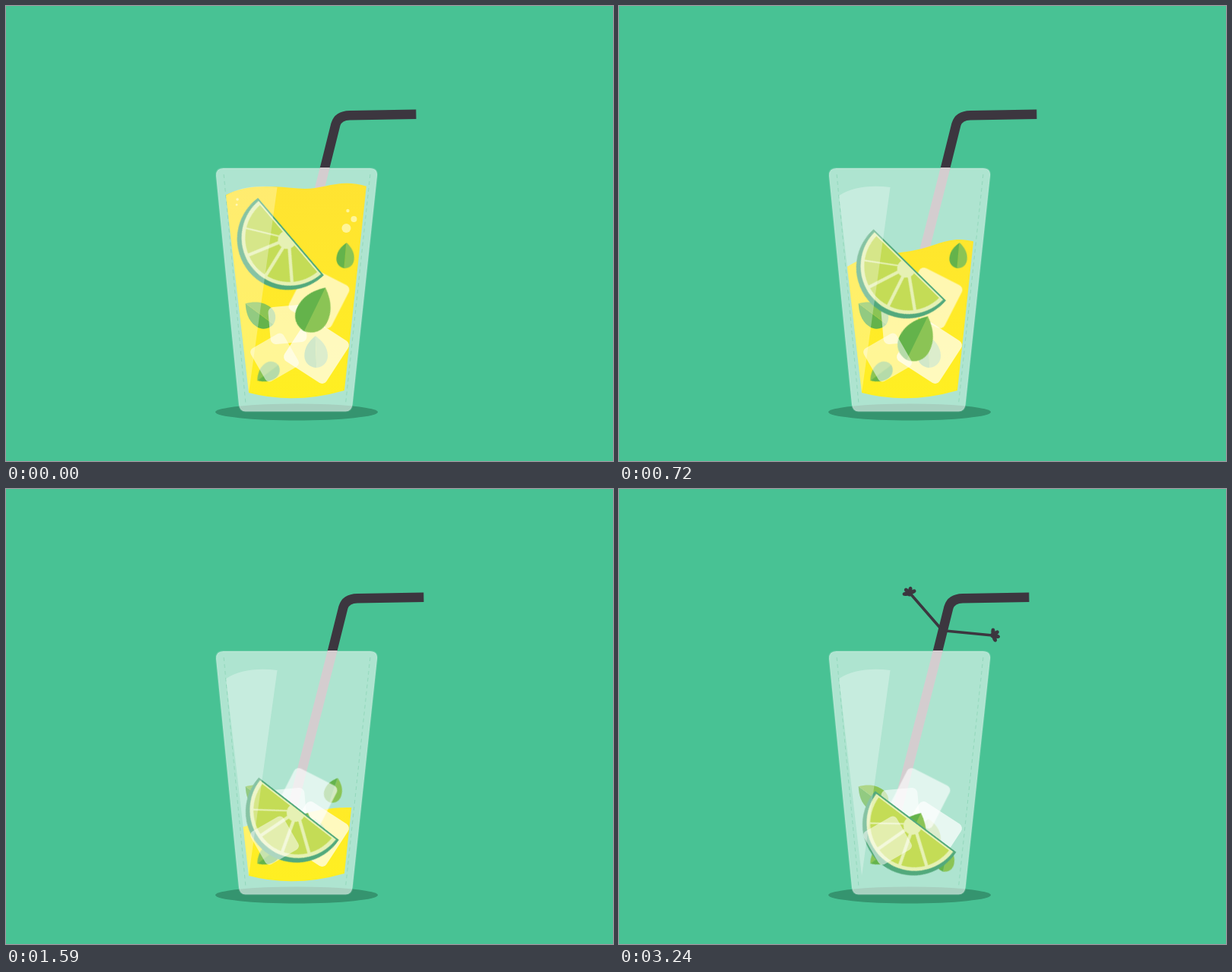
These frames come from a looping animation (800x600 px, 3.27 s). An HTML page:

```html
<!DOCTYPE html>
<html lang="en">
<head>
<meta charset="utf-8">
<title>Lemonade</title>
<style>
  html, body { margin: 0; width: 100%; height: 100%; overflow: hidden; background: #48c294; }
  svg { display: block; width: 800px; height: 600px; }

  .move { animation: 3270ms linear infinite; }
  #straw, #strawInGlass { animation-name: slide; }
  #liquid { animation-name: drain; }
  #lime { animation-name: lime; }
  #bigLeaf { animation-name: bigLeaf; }
  #smallLeaf { animation-name: smallLeaf; }
  #looseIce { animation-name: looseIce; }
  #arms { animation-name: pop; transform-origin: 427px 186px; }

  @keyframes slide {
    0% { transform: translateX(0); animation-timing-function: ease-in-out; }
    9.2%, 59.6% { transform: translateX(10px); animation-timing-function: ease-in-out; }
    67.9%, 100% { transform: translateX(0); }
  }
  @keyframes drain {
    0% { d: path("M280 255C310 233 350 237 385 240.5S440 223 485 241V530H280Z"); }
    15.6% { d: path("M280 350C305 300 345 306 385 300S440 262 485 284V530H280Z"); }
    29.36% { d: path("M280 378C315 356 345 357 385 349S440 336 485 354V530H280Z"); }
    36.7% { d: path("M280 412C315 390 345 392 385 382S440 368 485 400V530H280Z"); }
    48.62% { d: path("M280 460C315 440 345 438 385 429S440 418 485 421V530H280Z"); }
    64.22% { d: path("M280 490C315 512 345 514 385 515S440 508 485 492V530H280Z"); }
    67.5%, 100% { d: path("M280 502C315 524 345 526 385 527S440 520 485 504V530H280Z"); }
  }
  @keyframes lime {
    0% { transform: translate(375.5px, 304px) rotate(49.6deg); }
    15.6% { transform: translate(380.5px, 324.5px) rotate(47.5deg); }
    29.36% { transform: translate(386.5px, 360.5px) rotate(41.3deg); }
    36.7% { transform: translate(381.5px, 397.5px) rotate(38.2deg); }
    48.62% { transform: translate(386px, 421.5px) rotate(37.9deg); }
    62%, 100% { transform: translate(391px, 438.5px) rotate(37deg); }
  }
  @keyframes bigLeaf {
    0% { transform: translate(0, 0); }
    15.6% { transform: translate(-6px, 22px); }
    29.36%, 100% { transform: translate(-23px, 56px); }
  }
  @keyframes smallLeaf {
    0%, 23% { transform: translate(447.5px, 329px) rotate(5deg); }
    29.36% { transform: translate(443px, 346px) rotate(8deg); }
    36.7% { transform: translate(438.5px, 365px) rotate(15deg); }
    48.62% { transform: translate(432px, 397px) rotate(18deg); }
    63%, 100% { transform: translate(431px, 488px) rotate(12deg); }
  }
  @keyframes looseIce {
    0%, 27.5% { transform: translate(412.5px, 385px) rotate(27deg); }
    29.36% { transform: translate(411.5px, 386px) rotate(28.5deg); }
    36.7% { transform: translate(397px, 406px) rotate(31deg); }
    44%, 100% { transform: translate(396.5px, 408px) rotate(27deg); }
  }
  @keyframes pop {
    0%, 69% { transform: scale(0); animation-timing-function: ease-out; }
    79%, 100% { transform: scale(1); }
  }
</style>
</head>
<body>
<svg viewBox="0 0 800 600">
  <defs>
    <clipPath id="inner"><path d="M284.2 200L320 510Q380 526 446 507L479 200Z"/></clipPath>
    <linearGradient id="juice" gradientUnits="userSpaceOnUse" x1="0" y1="235" x2="0" y2="515">
      <stop offset="0" stop-color="#ffe332"/>
      <stop offset="1" stop-color="#ffef22"/>
    </linearGradient>
    <g id="leaf">
      <path fill="#64b34b" d="M0-32C-12-22-22-10-22 8C-22 22-12 31 0 32Z"/>
      <path fill="#8bc455" d="M0-32C12-22 22-10 22 8C22 22 12 31 0 32Z"/>
    </g>
    <g id="hand" fill="#3c363f">
      <circle r="3.5"/>
      <ellipse cy="-5" rx="2.6" ry="4.4" transform="rotate(-80)"/>
      <ellipse cy="-5" rx="2.6" ry="4.4" transform="rotate(-28)"/>
      <ellipse cy="-5" rx="2.6" ry="4.4" transform="rotate(24)"/>
      <ellipse cy="-5" rx="2.6" ry="4.4" transform="rotate(76)"/>
    </g>
  </defs>

  <rect width="800" height="600" fill="#48c294"/>
  <ellipse cx="383" cy="535.5" rx="107" ry="11" fill="#35946f"/>

  <g id="straw" class="move">
    <path d="M540.5 142.8L453 144.2Q438 144.5 434.5 156L419.5 216" fill="none" stroke="#3c363f" stroke-width="12.4"/>
  </g>

  <!-- glass -->
  <path d="M286.5 214H479.5Q490 214 489 224L456.500 525.500Q455.500 534.500 447.500 534.500H315.500Q308 534.500 307 525.500L277 224Q276.500 214 286.500 214Z" fill="#fff" fill-opacity=".56" stroke="#fff" stroke-opacity=".16" stroke-width="2"/>
  <path d="M287 222L316 525M480 222L447.500 525" fill="none" stroke="#86d2b3" stroke-opacity=".7" stroke-dasharray="5 4"/>

  <g id="strawInGlass" class="move">
    <path d="M413.800 213H426.800L371.500 430H358.500Z" fill="#d4cdcf"/>
  </g>

  <g clip-path="url(#inner)">
    <path id="liquid" class="move" fill="url(#juice)" d="M280 255C310 233 350 237 385 240.5S440 223 485 241V530H280Z"/>
  </g>
  <g id="bubbles" fill="#fff59a"></g>

  <use href="#leaf" transform="translate(408.5 456) rotate(-2) scale(.7 .66)"/>
  <g id="smallLeaf" class="move"><use href="#leaf" transform="scale(.53)"/></g>
  <g id="looseIce" class="move"><rect x="-31.500" y="-31.500" width="63" height="63" rx="7" fill="#fff" fill-opacity=".63"/></g>
  <rect x="-33" y="-33" width="66" height="66" rx="7" transform="translate(409 455) rotate(33)" fill="#fff" fill-opacity=".7"/>
  <use href="#leaf" transform="translate(334 406) rotate(-53) scale(.72)"/>
  <rect x="-24" y="-24.500" width="48" height="49" rx="7" transform="translate(371 420) rotate(-5)" fill="#fff" fill-opacity=".58"/>
  <g id="bigLeaf" class="move"><use href="#leaf" transform="translate(407 400) rotate(26)"/></g>
  <use href="#leaf" transform="translate(345 483.5) rotate(-127) scale(.54)"/>

  <g id="lime" class="move">
    <path d="M-66.800 0A67 67 0 1 0 66.800 0Z" fill="#52a97c"/>
    <path d="M-63.500 2A63.500 63.500 0 1 0 63.500 2Z" fill="#e6f1b4"/>
    <path d="M-58 3A58 58 0 1 0 58 3Z" fill="#c4dc56"/>
    <g id="ribs" stroke="#e6f1b4"></g>
    <path d="M-11 2A12 12 0 1 0 11 2Z" fill="#e6f1b4"/>
    <path d="M-62 3H62" stroke="#e6f1b4" stroke-width="2"/>
  </g>

  <rect x="-25" y="-25" width="50" height="50" rx="6" transform="translate(354 463.500) rotate(-30)" fill="#fff" fill-opacity=".52"/>
  <path d="M290 250Q315 234 357.500 239L320 510Z" fill="#fff" fill-opacity=".3"/>

  <g id="arms" class="move">
    <path d="M424 184L384 138M430 187L492 193" stroke="#3c363f" stroke-width="3.600"/>
    <use href="#hand" transform="translate(383 138) rotate(-15)"/>
    <use href="#hand" transform="translate(493 193) rotate(80)"/>
  </g>
</svg>
<script>
  const NS = "http://www.w3.org/2000/svg";
  const add = (parent, tag, attrs) => {
    const el = document.createElementNS(NS, tag);
    for (const key in attrs) el.setAttribute(key, attrs[key]);
    return document.getElementById(parent).appendChild(el);
  };

  // four ribs split the half slice into five equal segments
  for (let i = 1; i < 5; i++) {
    add("ribs", "line", {
      x1: 0, y1: 4, x2: 59, y2: 4, "stroke-width": i === 4 ? 2 : 4.2,
      transform: `rotate(${i * 36} 0 4)`
    });
  }

  // each bubble vanishes when the surface reaches it
  const bubbles = [[448.5, 293, 6, 480], [458.5, 281, 4, 390], [450.5, 270, 2.2, 290], [305, 255, 1.8, 60], [304, 262, 1.5, 90]];
  for (const [cx, cy, r, end] of bubbles) {
    const at = end / 3270;
    add("bubbles", "circle", { cx, cy, r }).animate(
      [{ opacity: 1 }, { opacity: 1, offset: at }, { opacity: 0, offset: at }, { opacity: 0 }],
      { duration: 3270, iterations: Infinity }
    );
  }
</script>
</body>
</html>
```
